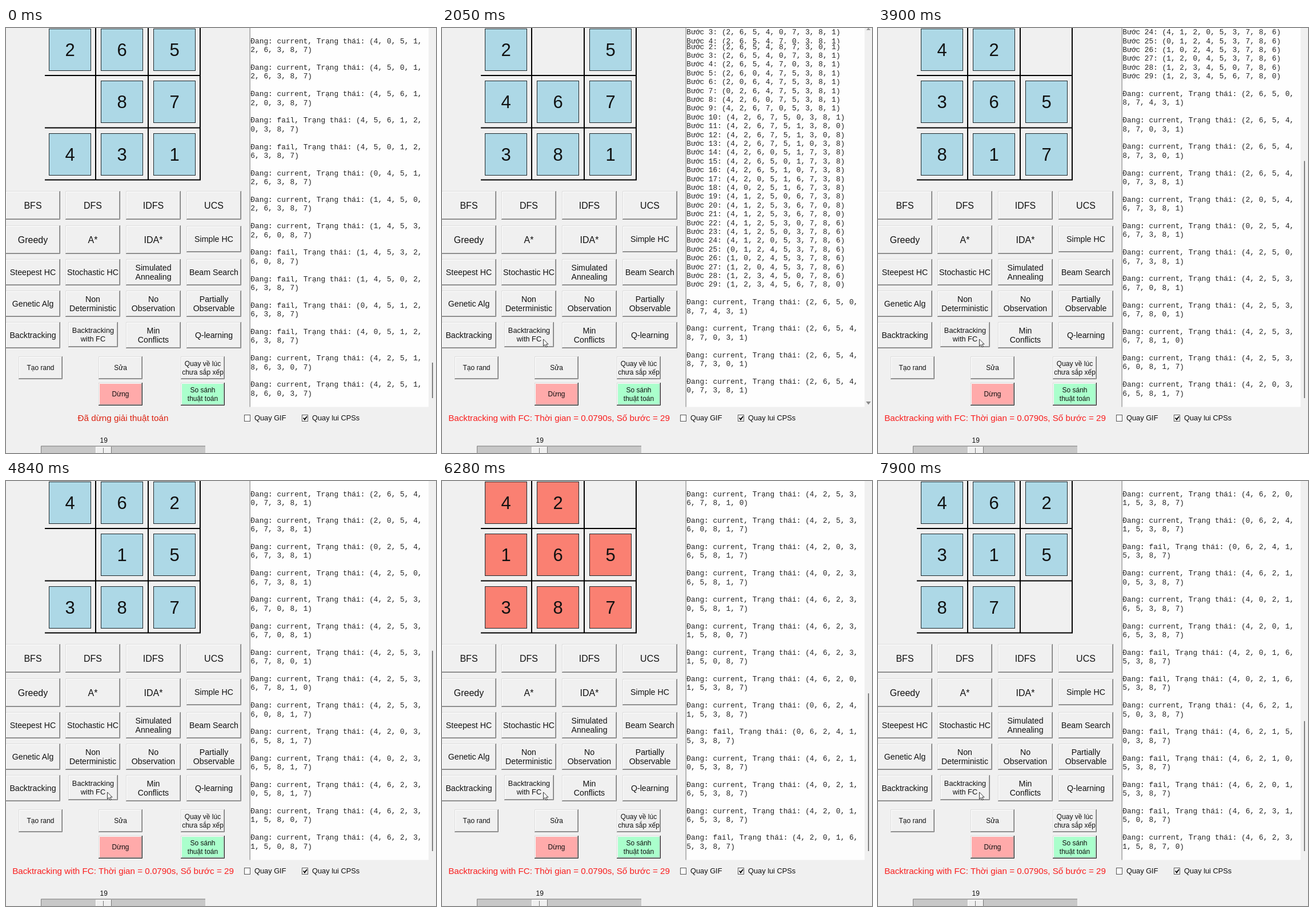
Recreate the animation shown at these times as an HTML page. Size 753 by 743 pixels, loop 8000 ms.

```html
<!DOCTYPE html>
<html lang="vi">
<head>
<meta charset="utf-8">
<style>
html, body { margin: 0; width: 100%; height: 100%; overflow: hidden; background: #f0f0f0; }
svg { display: block; width: 100vw; height: 100vh; }
text { font-family: "Liberation Sans", Arial, sans-serif; fill: #111; }
.log text { font: 12.83px "Liberation Mono", "Courier New", monospace; fill: #222; }
.mid { text-anchor: middle; }
</style>
</head>
<body>
<svg id="stage" viewBox="0 0 753 743">
  <defs>
    <clipPath id="topClip"><rect id="topRect" x="428" y="0" width="312" height="0"/></clipPath>
    <clipPath id="lowClip"><rect id="lowRect" x="428" y="0" width="312" height="662"/></clipPath>
  </defs>
  <rect width="753" height="743" fill="#f0f0f0"/>
  <path d="M157 0V266M249 0V266M340 0V266M68 83H341M68 174.5H341M68 265.5H341" stroke="#000" stroke-width="2" fill="none"/>
  <g id="tiles"></g>
  <g id="buttons"></g>
  <rect x="427" y="0" width="313" height="662.5" fill="#fefefe"/>
  <path d="M427.2 0V662.5" stroke="#8a8a8a" stroke-width="1.2"/>
  <g class="log" id="topLog" clip-path="url(#topClip)"></g>
  <g class="log" id="lowLog" clip-path="url(#lowClip)"></g>
  <path id="thumb" stroke="#666" stroke-width="1.6"/>
  <path id="arrows" d="M742.5 653H751L746.8 658.5ZM743 3.5L746.8 0L750.5 3.5Z" fill="#8a8a8a"/>
  <text id="status" class="mid" x="205" y="687" font-size="15.2"></text>
  <g fill="#fff" stroke="#555">
    <rect x="417.5" y="676.5" width="10" height="11"/>
    <rect x="518.5" y="676.5" width="10" height="11"/>
  </g>
  <path d="M520.8 681.5L523 684.5L527 679" fill="none" stroke="#000" stroke-width="2"/>
  <text x="435" y="686.4" font-size="12.8">Quay GIF</text>
  <text x="536" y="686.4" font-size="12.8">Quay lui CPSs</text>
  <text class="mid" x="171.3" y="725.3" font-size="12">19</text>
  <rect x="61" y="730.5" width="288" height="14" fill="#c8c8c8"/>
  <path d="M61.5 743V731H349" fill="none" stroke="#808080"/>
  <rect x="157" y="732" width="28" height="12" fill="#f0f0f0"/>
  <path d="M157.5 743V732.5H184" fill="none" stroke="#fff"/>
  <path d="M184.5 732V743M170.5 734V743" stroke="#777"/>
  <path id="cursor" d="M0 0V12L2.8 9.5L4.8 14L6.8 13L4.9 8.8H8.6Z" fill="#fff" stroke="#222" stroke-width="0.9"/>
</svg>
<script>
const LOOP = 8000, LINE = 15.4, VIEW = 662, TEAR_MS = 65;
const $ = id => document.getElementById(id);
const list = cells => [...cells].join(", ");

// Slides the blank: U, D, L, R move it, F reports a failed state and steps back.
function walk(start, moves) {
  const shift = { U: -3, D: 3, L: -1, R: 1 };
  const stack = [start], states = [{ cells: start, fail: false }];
  for (const m of moves) {
    if (m === "F") {
      states.push({ cells: stack.pop(), fail: true });
      continue;
    }
    const cells = [...stack[stack.length - 1]];
    const a = cells.indexOf("0"), b = a + shift[m];
    [cells[a], cells[b]] = [cells[b], cells[a]];
    stack.push(cells.join(""));
    states.push({ cells: cells.join(""), fail: false });
  }
  return states;
}

const earlier = walk("425106387", "URDFFLDDFFFFDL").slice(1);
const solution = walk("265087431", "DRURULLDRRDLLURRULDDRULLURRDD");
const search = walk("265087431", "DRUULDDRRUULDDLUUFRURFFRFFFFR");

function entry({ cells, fail }) {
  const cut = fail ? 5 : 4;
  return [`Đang: ${fail ? "fail" : "current"}, Trạng thái: (${list(cells.slice(0, cut))},`,
    `${list(cells.slice(cut))})`, ""];
}

const oldLines = earlier.flatMap(entry);
const newLines = [...solution.map((s, i) => `Bước ${i}: (${list(s.cells)})`), "", ...search.flatMap(entry)];

// Search pace: [step, time] points, even in between.
const pace = [[-1, 900], [0, 1140], [4, 2050], [8, 2925], [9, 3240], [16, 4840], [20, 5725], [25, 6890], [29, 7830], [30, 8060]];

function startOf(k) {
  const i = pace.findIndex(p => p[0] > k);
  const [k0, t0] = pace[i - 1], [k1, t1] = pace[i];
  return t0 + (t1 - t0) * (k - k0) / (k1 - k0);
}

function logMarkup(k) {
  const lines = k < 0 ? oldLines : newLines.slice(0, 34 + 3 * k);
  const first = k < 0 ? 22.6 : k < 4 ? 1.6 : 623 - LINE * (31 + 3 * k);
  return lines.map((s, i) => {
    const y = first + LINE * i;
    return s && y > -10 && y < VIEW + 8 ? `<text x="428.3" y="${(y + 4.2).toFixed(1)}">${s}</text>` : "";
  }).join("");
}

function boardMarkup({ cells, fail }) {
  const fill = fail ? "#fa8072" : "#add8e6";
  return [...cells].map((d, i) => {
    if (d === "0") return "";
    const x = 75.5 + Math.round(91.4 * (i % 3)), y = 1.5 + Math.round(91.3 * Math.floor(i / 3));
    return `<rect x="${x}" y="${y}" width="73" height="73" fill="${fill}" stroke="#1c262a"/>
      <text class="mid" x="${x + 36.5}" y="${y + 47.6}" font-size="31">${d}</text>`;
  }).join("");
}

function button(label, x, y, w, h, size, fill = "#f0f0f0", edge = "#777") {
  const rows = label.split("|"), gap = size > 13 ? 16 : 14.7;
  const r = x + w, b = y + h, mid = y + h / 2 - (rows.length - 1) * gap / 2;
  return `<rect x="${x}" y="${y}" width="${w}" height="${h}" fill="${fill}"/>
    <path d="M${x + .5} ${b}V${y + .5}H${r}" fill="none" stroke="#dcdcdc"/>
    <path d="M${x + 1.5} ${b - 1}V${y + 1.5}H${r - 1}" fill="none" stroke="#fff"/>
    <path d="M${x + 1} ${b - 1.5}H${r - 1.5}V${y + 1}" fill="none" stroke="#a8a8a8"/>
    <path d="M${x} ${b - .5}H${r - .5}V${y}" fill="none" stroke="${edge}"/>` +
    rows.map((s, i) => `<text class="mid" x="${x + w / 2}" y="${mid + i * gap + size * .35}" font-size="${size}">${s}</text>`).join("");
}

function drawButtons() {
  const grid = [
    [285, 50, 16, ["BFS", "DFS", "IDFS", "UCS"]],
    [345, 50, 16, ["Greedy", "A*", "IDA*", "Simple HC"]],
    [404, 46, 14.2, ["Steepest HC", "Stochastic HC", "Simulated|Annealing", "Beam Search"]],
    [459, 46, 14.2, ["Genetic Alg", "Non|Deterministic", "No|Observation", "Partially|Observable"]],
    [514, 46, 14.2, ["Backtracking", "Backtracking|with FC", "Min|Conflicts", "Q-learning"]]
  ];
  let out = "";
  for (const [y, h, size, labels] of grid) {
    labels.forEach((label, c) => {
      const x = Math.round(-1.5 + 105.8 * c);
      if (label === "Simple HC") out += button(label, x, 346, 96, 46, 14.2);
      else if (label.endsWith("FC")) out += button(label, 109, 514, 87, 44, 12.8);
      else out += button(label, x, y, 96, h, size);
    });
  }
  const small = (label, x, y, ...paint) => button(label, x, y, 77, 40, 12, ...paint);
  out += small("Tạo rand", 22, 574) + small("Sửa", 162, 574) + small("Quay về lúc|chưa sắp xếp", 306, 574);
  out += small("Dừng", 162, 620, "#ffaaaa", "#222") + small("So sánh|thuật toán", 306, 620, "#aaffcc", "#222");
  $("buttons").innerHTML = out;
}

function moveCursor(t) {
  const cursor = $("cursor");
  cursor.style.display = t < 70 ? "none" : "";
  const step = Math.min(13, Math.floor((t - 70) / 76));
  const out = Math.min(1, step / 9), back = Math.max(0, (step - 9) / 4);
  const ease = 1 - (1 - out) ** 2;
  const x = 646 - 480 * ease + 11.5 * back, y = 727 - 194 * ease + 11 * back;
  cursor.setAttribute("transform", `translate(${x} ${y})`);
}

let shown = "";
function render(t) {
  moveCursor(t);
  let k = -1;
  while (k < 29 && t >= startOf(k + 1)) k++;
  // While the log repaints, only its upper part has scrolled on.
  const torn = k >= 0 && t < startOf(k) + TEAR_MS;
  const tear = torn ? (261 + 17.58 * k) % 304.25 : VIEW;
  const key = k + ":" + tear;
  if (key === shown) return;
  shown = key;

  const low = torn ? k - 1 : k;
  $("tiles").innerHTML = boardMarkup(search[Math.max(k, 0)]);
  $("topLog").innerHTML = logMarkup(k);
  $("lowLog").innerHTML = torn ? logMarkup(low) : "";
  $("topRect").setAttribute("height", tear);
  $("lowRect").setAttribute("y", tear);
  $("lowRect").setAttribute("height", VIEW - tear);

  const hidden = 211 + 3 * LINE * (low - 8);
  const top = low < 0 ? 585 : 13 + 634 * hidden / (hidden + 660);
  const fits = low >= 0 && low < 4;
  $("thumb").setAttribute("d", fits ? "" : `M746.8 ${top}V647`);
  $("arrows").style.display = fits ? "" : "none";

  const status = $("status");
  status.textContent = k < 0 ? "Đã dừng giải thuật toán"
    : "Backtracking with FC: Thời gian = 0.0790s, Số bước = 29";
  status.style.fill = k < 0 ? "#dc200f" : "#fa1e1e";
}

drawButtons();
const origin = performance.now();
function tick() {
  render((performance.now() - origin) % LOOP);
  requestAnimationFrame(tick);
}
tick();
</script>
</body>
</html>
```
